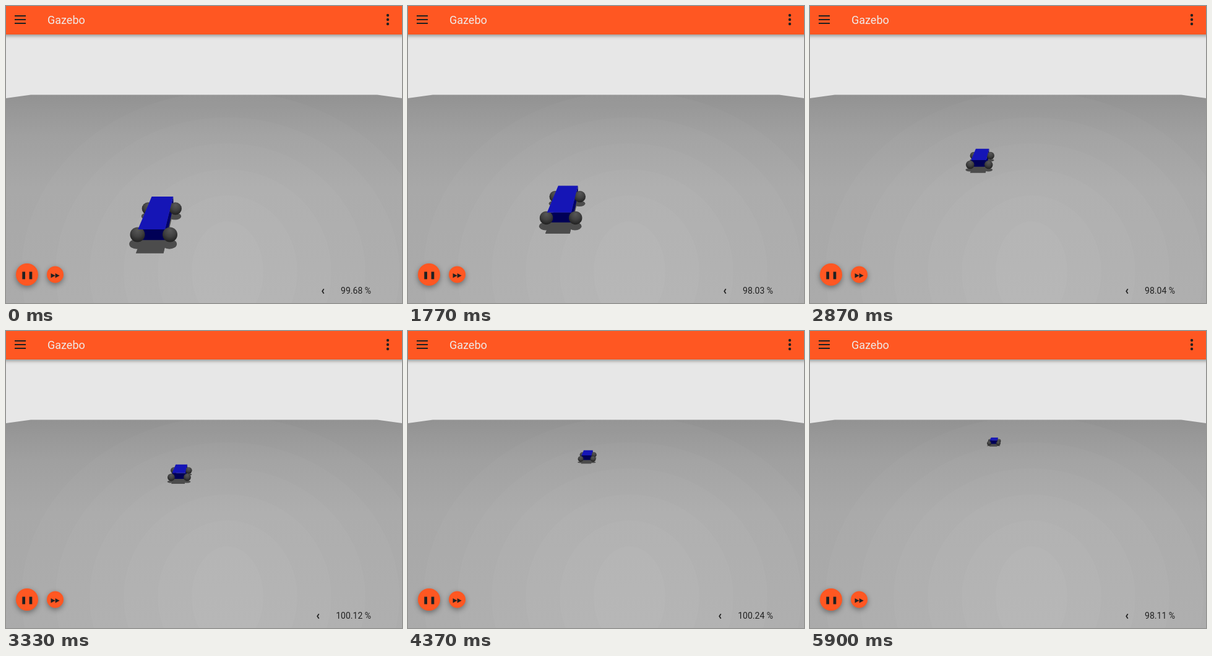
Recreate the animation shown at these times as an HTML page with a canvas. Size 640 by 480 pixels, loop 5.93 s.

```html
<!DOCTYPE html>
<html lang="en">
<head>
<meta charset="utf-8">
<title>Gazebo</title>
<style>
  html, body { margin: 0; width: 640px; height: 480px; overflow: hidden; background: #e7e7e7; }
  canvas { position: absolute; left: 0; top: 0; }
  .title, .rate { position: absolute; font-family: Roboto, Arial, sans-serif; white-space: pre; }
  .title { left: 67px; top: 0; font-size: 18px; line-height: 46px; color: #efe9e7; }
  .rate { right: 50px; top: 450px; font-size: 14px; line-height: 20px; color: #212121; }
  body { position: relative; }
</style>
</head>
<body>
<canvas id="view" width="640" height="480"></canvas>
<div class="title">Gazebo</div>
<div class="rate" id="rate"></div>
<script>
const view = document.getElementById('view');
const ctx = view.getContext('2d');
const rate = document.getElementById('rate');

const LOOP = 5930, FPS = 30;
const ORANGE = '#ff5722', INK = '#212121';

// Real-time factor readings, refreshed about every 200 ms
const RATES = [99.68, 99.91, 100.34, 99.57, 100.22, 101.05, 99.12, 100.18, 98.71, 98.03,
  100.27, 96.99, 98.85, 100.31, 98.04, 99.21, 100.12, 99.43, 98.94, 100.52,
  99.36, 98.62, 100.24, 99.57, 97.98, 98.63, 99.34, 98.82, 100.16, 98.11];

// Perspective: vanishing point, and depth gained per unit of drop
const VX = 320, VY = 107, TILT = 0.00069;
const AXLE = 262.5, TOP = 243.2, BOTTOM = 263.7, GROUND = 276;
const CAR = { left: -102.25, right: -60.25, near: -0.029, far: 0.223 };
const WHEEL = { left: -107.5, right: -55, near: 0, far: 0.191, r: 12 };

function project(x, u, h, z) {
  const k = 1 / (z + u + (h - AXLE) * TILT);
  return { x: VX + k * x, y: VY + k * h, k };
}

function poly(points, color, g = ctx) {
  g.beginPath();
  points.forEach(p => g.lineTo(p.x, p.y));
  g.closePath();
  g.fillStyle = color;
  g.fill();
}

function disc(g, x, y, rx, ry, color) {
  g.beginPath();
  g.ellipse(x, y, rx, ry, 0, 0, Math.PI * 2);
  g.fillStyle = color;
  g.fill();
}

function drop(g, color, blur, dy) {
  g.shadowColor = color;
  g.shadowBlur = blur;
  g.shadowOffsetY = dy;
}

function paintGround(g) {
  g.save();
  g.beginPath();
  for (const [x, y] of [[0, 149], [40, 143.5], [600, 143.5], [640, 149], [640, 480], [0, 480]]) g.lineTo(x, y);
  g.clip();
  const shade = g.createLinearGradient(0, 143, 0, 480);
  [[0, '#929292'], [0.08, '#989898'], [0.2, '#a0a0a0'], [0.45, '#a8a8a8'], [1, '#ababab']]
    .forEach(([at, c]) => shade.addColorStop(at, c));
  g.fillStyle = shade;
  g.fillRect(0, 140, 640, 340);
  for (let i = 0; i < 6; i++) {
    disc(g, 358, 430, 58 + i * 55, 82 + i * 42, 'rgba(255,255,255,0.024)');
  }
  g.restore();
}

function paintBar(g) {
  g.save();
  drop(g, 'rgba(0,0,0,0.4)', 6, 2);
  g.fillStyle = ORANGE;
  g.fillRect(-10, -10, 660, 56);
  g.restore();
  g.fillStyle = INK;
  for (const y of [15, 21, 27]) g.fillRect(14, y, 18, 2);
  for (const y of [15, 22, 29]) disc(g, 617, y, 2.2, 2.2, INK);
}

function paintButtons(g) {
  g.save();
  drop(g, 'rgba(0,0,0,0.38)', 9, 3);
  disc(g, 34, 434, 18, 18, ORANGE);
  disc(g, 79.5, 434, 13.5, 13.5, ORANGE);
  g.restore();
  g.fillStyle = INK;
  g.fillRect(26.3, 429.5, 4.7, 12);
  g.fillRect(37.6, 429.5, 4.7, 12);
  for (const x of [72.5, 79.6]) {
    poly([{ x, y: 432 }, { x: x + 7.1, y: 435.8 }, { x, y: 439.6 }], INK, g);
  }
}

// Everything that never moves is painted once
const scene = document.createElement('canvas');
scene.width = 640;
scene.height = 480;
const sg = scene.getContext('2d');
sg.fillStyle = '#e7e7e7';
sg.fillRect(0, 0, 640, 480);
paintGround(sg);
paintBar(sg);
paintButtons(sg);

function wheel(x, u, z) {
  const p = project(x, u, AXLE, z), r = WHEEL.r * p.k;
  const g = ctx.createRadialGradient(p.x, p.y - r * 0.6, r * 0.1, p.x, p.y - r * 0.3, r * 1.35);
  g.addColorStop(0, '#555555');
  g.addColorStop(0.5, '#414141');
  g.addColorStop(1, '#1e1e1e');
  disc(ctx, p.x, p.y, r, r, g);
}

// The sun leans, so taller parts throw their shade further back
function cast(x, u, h, z) {
  const rise = GROUND - h;
  return project(x - rise * 0.046, u - rise * 0.00113, GROUND, z);
}

function shadow(z) {
  const color = '#4c4c4c';
  const { left, right, near, far } = CAR;
  for (const x of [WHEEL.left, WHEEL.right]) {
    for (const u of [WHEEL.near, WHEEL.far]) {
      const p = cast(x, u, AXLE, z);
      disc(ctx, p.x, p.y, WHEEL.r * p.k, 8 * p.k * p.k, color);
    }
  }
  const at = (x, u, h) => cast(x, u, h, z);
  poly([at(left, near, TOP), at(right, near, TOP), at(right, far, TOP), at(left, far, TOP)], color);
  poly([at(left, near, TOP), at(right, near, TOP), at(right, far, BOTTOM), at(left, far, BOTTOM)], color);
}

function car(z) {
  const { left, right, near, far } = CAR;
  const at = (x, u, h) => project(x, u, h, z);
  shadow(z);
  wheel(WHEEL.left, WHEEL.far, z);
  poly([at(right, near, TOP), at(right, far, TOP), at(right, far, BOTTOM), at(right, near, BOTTOM)], '#000068');
  wheel(WHEEL.right, WHEEL.far, z);
  poly([at(left, near, TOP), at(right, near, TOP), at(right, near, BOTTOM), at(left, near, BOTTOM)], '#000056');
  wheel(WHEEL.left, WHEEL.near, z);
  wheel(WHEEL.right, WHEEL.near, z);
  poly([at(left, near, TOP), at(right, near, TOP), at(right, far, TOP), at(left, far, TOP)], '#1515b6');
}

// Rest, a short even acceleration, then constant speed
function depth(s) {
  const start = 1.33, ramp = 0.484, speed = 0.583;
  const d = Math.max(0, s - start);
  return 1 + speed * (d < ramp ? d * d / (2 * ramp) : d - ramp / 2);
}

function reading(ms) {
  const i = ms < 130 ? 0 : ms < 370 ? 1 : 2 + Math.floor((ms - 370) / 200);
  return RATES[Math.min(i, RATES.length - 1)];
}

function chevron(x) {
  ctx.beginPath();
  ctx.moveTo(x + 1.7, 457.3);
  ctx.lineTo(x - 0.8, 461);
  ctx.lineTo(x + 1.7, 464.7);
  ctx.strokeStyle = INK;
  ctx.lineWidth = 1.7;
  ctx.stroke();
}

function draw(ms) {
  const s = Math.floor((ms + 5) * FPS / 1000) / FPS;
  const value = reading(ms);
  const text = value.toFixed(2) + ' %';
  ctx.drawImage(scene, 0, 0);
  car(depth(s));
  chevron(value < 100 ? 512 : 504);
  if (rate.textContent !== text) rate.textContent = text;
}

const begin = performance.now();
function tick() {
  draw((performance.now() - begin) % LOOP);
  requestAnimationFrame(tick);
}
tick();
</script>
</body>
</html>
```
